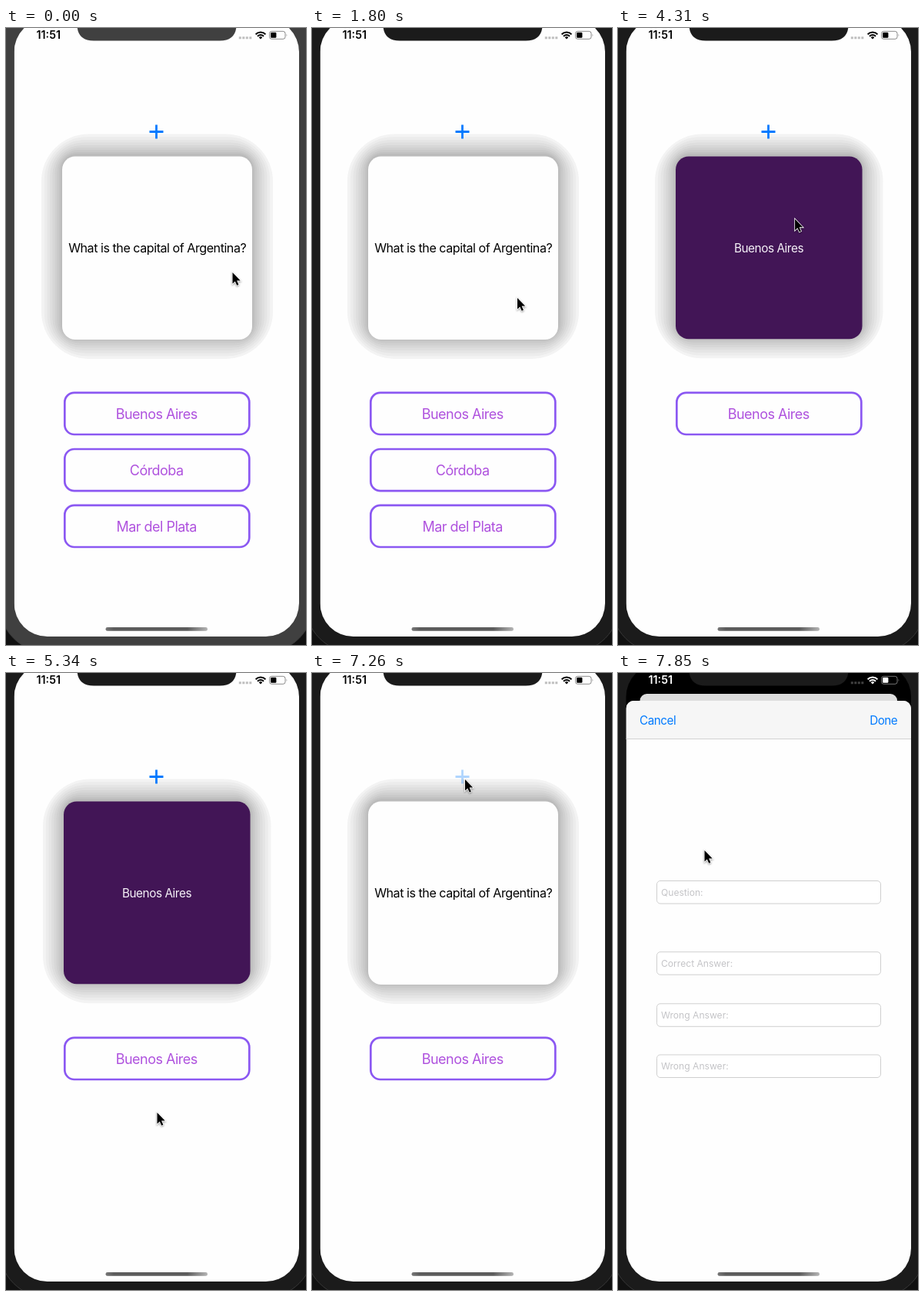
Recreate the animation shown at these times as an HTML page. Size 390 px wide and 800 px high, loop 8000 ms.

```html
<!DOCTYPE html>
<html lang="en">
<head>
<meta charset="utf-8">
<title>Quiz card</title>
<style>
  html, body { margin: 0; height: 100%; overflow: hidden; background: #111; }
  svg { display: block; }
  text { font: 16.1px Inter, "Liberation Sans", sans-serif; letter-spacing: -.029em; }
  .mid { text-anchor: middle; }
  .choice rect { fill: none; stroke: #8b58f2; stroke-width: 2.7; }
  .choice text { fill: #af52de; font-size: 18px; }
  .bar text { fill: #007aff; font-size: 15.2px; }
  .field rect { fill: #fff; stroke: #cfcfcf; }
  .field text { fill: #c4c4c7; font-size: 12.1px; letter-spacing: 0; }
  #clock { font-size: 14.3px; font-weight: 600; letter-spacing: 0; }
</style>
</head>
<body>
<svg width="390" height="800" viewBox="0 0 390 800">
  <defs>
    <clipPath id="screen"><rect x="10.5" y="-12" width="370.5" height="801" rx="43"/></clipPath>
    <linearGradient id="homeFill">
      <stop offset="0" stop-color="#777"/><stop offset=".08" stop-color="#5c5c5c"/>
      <stop offset=".8" stop-color="#5c5c5c"/><stop offset="1" stop-color="#b4b4b4"/>
    </linearGradient>
  </defs>
  <rect class="bezel" x="-9" y="-60" width="409" height="870" rx="64" stroke="#383838"/>
  <g clip-path="url(#screen)">
    <rect width="390" height="800"/>
    <g id="page">
      <rect x="10.5" y="-12" width="370.5" height="810" rx="10" fill="#fefefe"/>
      <g id="shadow"></g>
      <rect id="card" y="166.5" rx="17"/>
      <text id="label" class="mid" x="196.7" y="291.3"></text>
      <path id="plus" d="M186.5 134.5h18M195.5 125.5v18" stroke-width="2.8"/>
      <g id="choices"></g>
      <rect id="dim" x="10.5" y="-12" width="370.5" height="810" rx="10"/>
    </g>
    <g id="sheet">
      <rect x="10.5" width="370.5" height="900" rx="10" fill="#fefefe"/>
      <path d="M10.5 49.5V10a10 10 0 0 1 10-10H371a10 10 0 0 1 10 10v39.5z" fill="#f6f6f6"/>
      <path d="M10 49.5h371" stroke="#d2d2d2"/>
      <g class="bar">
        <text x="28" y="30.5">Cancel</text>
        <text x="363.3" y="30.5" text-anchor="end">Done</text>
      </g>
      <g id="fields"></g>
    </g>
    <g id="status">
      <text id="clock" x="39.5" y="14.4">11:51</text>
      <path d="M302.8 12.7h17" stroke="currentColor" stroke-width="3" stroke-dasharray="3 1.5" opacity=".25"/>
      <g fill="none" stroke="currentColor" stroke-width="2">
        <path d="M324.6 8.2a9 9 0 0 1 12.8 0M327 10.8a5.6 5.6 0 0 1 8 0"/>
      </g>
      <path d="M331 14.6l-2.2-2.4a3 3 0 0 1 4.4 0z"/>
      <rect x="342.5" y="4.3" width="20.5" height="10" rx="2.8" fill="none" stroke="currentColor" opacity=".45"/>
      <rect x="344" y="5.8" width="7.4" height="7" rx="1.2"/>
      <path d="M364.6 7.6q1.6 1.7 0 3.4z" opacity=".45"/>
    </g>
    <rect x="129.5" y="777" width="132.5" height="4.8" rx="2.4" fill="url(#homeFill)"/>
  </g>
  <path class="bezel" d="M92.5-2Q94 16.5 114 16.5H278Q298 16.5 299.5-2z"/>
  <path id="cursor" d="M0 0V14.6L3.3 11.5 5.7 16.7 7.9 15.7 5.6 10.6H10.2Z"
    stroke="#fff" stroke-width="1.6" paint-order="stroke" style="filter:drop-shadow(0 1px 1px #0006)"/>
</svg>
<script>
const LOOP = 8000, TICK = 148;
const $ = id => document.getElementById(id);
const set = (el, attrs) => { for (const k in attrs) el.setAttribute(k, attrs[k]); };
const mix = (a, b, p) => a + (b - a) * p;
const clamp = x => Math.min(1, Math.max(0, x));

const BANDS = 9;
const bands = Array.from({ length: BANDS }, (_, i) => {
  const el = document.createElementNS('http://www.w3.org/2000/svg', 'rect');
  const shade = 243 - 7 * i;
  el.setAttribute('fill', `rgb(${shade},${shade},${shade})`);
  return $('shadow').appendChild(el);
});

$('choices').innerHTML = [['Buenos Aires', 472.8], ['Córdoba', 546], ['Mar del Plata', 618.8]]
  .map(([name, y]) => `<g class="choice"><rect x="76.3" y="${y}" width="240" height="54.2" rx="12.5"/>
    <text class="mid" x="195.7" y="${y + 33.8}">${name}</text></g>`).join('');
const choices = $('choices').children;

$('fields').innerHTML = [['Question:', 233.5], ['Correct Answer:', 325.7], ['Wrong Answer:', 392.8], ['Wrong Answer:', 459]]
  .map(([name, y]) => `<g class="field"><rect x="50.5" y="${y}" width="291" height="29.5" rx="4.5"/>
    <text x="56" y="${y + 19}">${name}</text></g>`).join('');

// pointer path: time, x, y
const path = [
  [290, 294.5, 317], [600, 267, 350], [2000, 267, 350], [2680, 192, 568], [3130, 192, 568],
  [3400, 182.5, 630], [3600, 182.5, 630], [4160, 215, 310], [4440, 247, 178], [5030, 144, 646],
  [5328, 196.5, 570], [5624, 215, 488], [5920, 223.5, 358], [6420, 223.5, 358],
  [6956, 199, 138], [7400, 199, 138], [7844, 112.5, 230]
];
function pointer(t) {
  const i = path.findIndex(k => k[0] > t);
  if (i === 0) return path[0].slice(1);
  if (i < 0) return path.at(-1).slice(1);
  const [t0, x0, y0] = path[i - 1], [t1, x1, y1] = path[i];
  const p = (t - t0) / (t1 - t0);
  return [mix(x0, x1, p), mix(y0, y1, p)];
}

// cubic-bezier(.32, .72, 0, 1)
function sheetEase(x) {
  let lo = 0, hi = 1, u = .5;
  for (let i = 0; i < 24; i++) {
    u = (lo + hi) / 2;
    if (.96 * u * (1 - u) ** 2 + u ** 3 < x) lo = u; else hi = u;
  }
  return 2.16 * u * (1 - u) ** 2 + 3 * u * u * (1 - u) + u ** 3;
}

function drawCard(flipped) {
  const x = flipped ? 75 : 73, w = flipped ? 242.5 : 247, h = flipped ? 236.8 : 237.5;
  bands.forEach((el, i) => {
    const d = 27 * (1 - i / BANDS) ** 1.3;
    set(el, { x: x - d, y: 164.5 - d, width: w + 2 * d, height: h + 2 * d, rx: 18 + 1.6 * d });
  });
  set($('card'), { x, width: w, height: h, fill: flipped ? '#421556' : '#fefefe' });
  const label = $('label');
  label.textContent = flipped ? 'Buenos Aires' : 'What is the capital of Argentina?';
  label.style.fontSize = flipped ? '15.3px' : '16.1px';
  set(label, { x: flipped ? 196 : 196.7, y: flipped ? 290.6 : 291.3, fill: flipped ? '#f6f2f8' : '#000' });
}

// a wrong answer dims when pressed, then is gone
const fade = (t, press) => t < press ? 1 : t < press + TICK ? .3 : 0;

function draw(now) {
  const t = Math.floor(now % LOOP / TICK) * TICK;
  for (const el of document.querySelectorAll('.bezel')) el.setAttribute('fill', t < 290 ? '#404040' : '#1b1b1b');

  drawCard(t >= 590 && t < 1770 || t >= 4140 && t < 6060);
  set(choices[1], { opacity: fade(t, 2800) });
  set(choices[2], { opacity: fade(t, 3540) });

  const p = sheetEase(clamp((t - 7290) / 500));
  const shown = t < 7290 ? 0 : p;
  set($('page'), { transform: `translate(195.75 ${mix(-12, 27, shown)}) scale(${1 - .097 * shown}) translate(-195.75 12)` });
  set($('dim'), { opacity: .126 * shown });
  set($('plus'), {
    stroke: `rgb(${165 * shown},${mix(122, 165, shown)},${mix(255, 165, shown)})`,
    opacity: t >= 7250 && t < 7290 ? .3 : 1
  });
  set($('sheet'), { transform: `translate(0 ${mix(789, 36, shown)})` });

  const ink = 255 * clamp((t - 7290) / 400);
  set($('status'), { fill: `rgb(${ink},${ink},${ink})`, color: `rgb(${ink},${ink},${ink})` });

  set($('cursor'), { transform: `translate(${pointer(t)})` });
}

let start;
function frame(now) {
  start ??= now;
  draw(now - start);
  requestAnimationFrame(frame);
}
draw(0);
requestAnimationFrame(frame);
</script>
</body>
</html>
```
